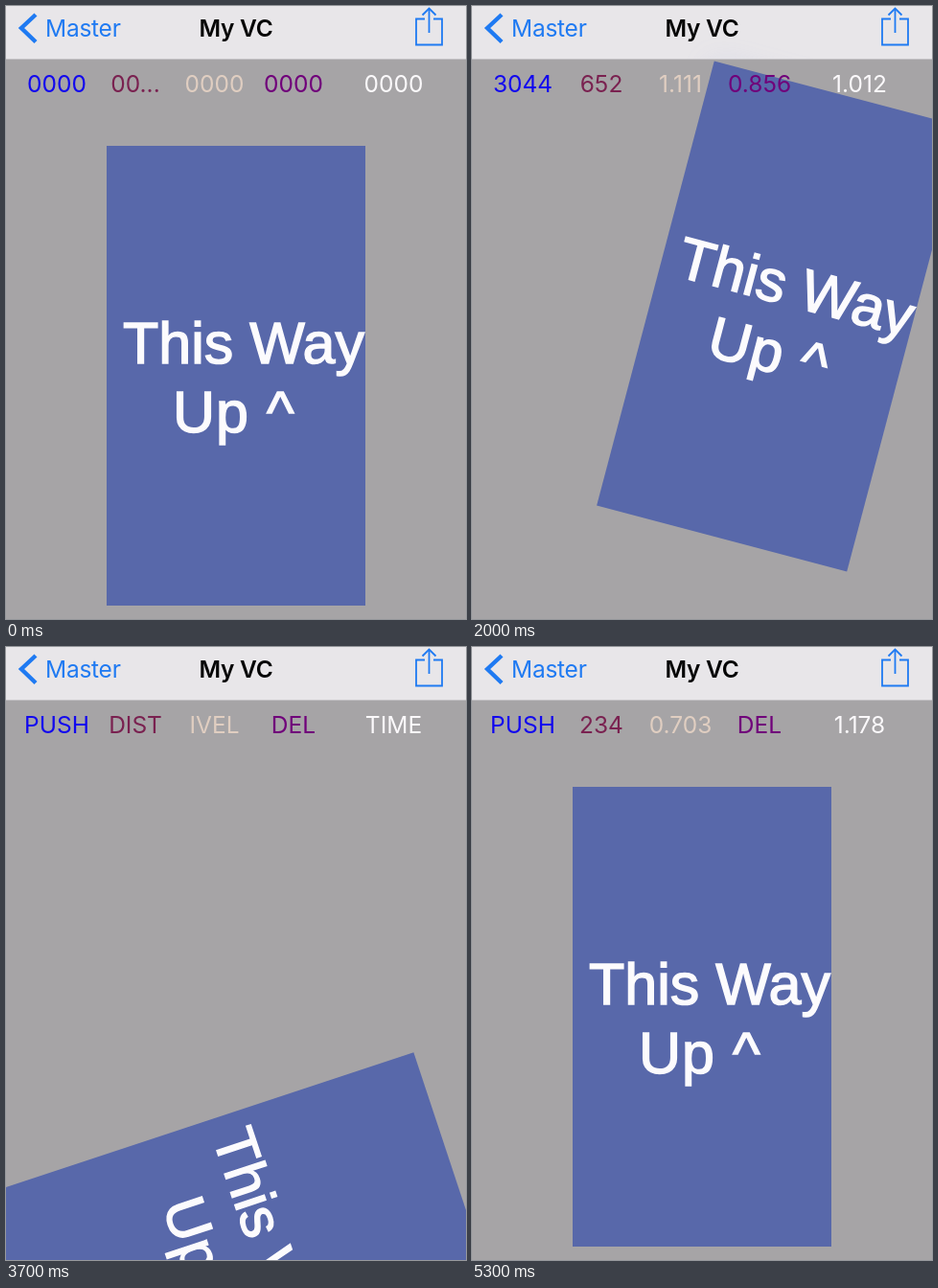
Animation, 480 px wide and 640 px high, one loop 5400 ms. Source, as an HTML page with a canvas:

```html
<!DOCTYPE html>
<html lang="en">
<head>
<meta charset="utf-8">
<title>My VC</title>
<style>
  html, body { margin: 0; width: 100%; height: 100%; overflow: hidden; background: #a6a4a6; }
  canvas { display: block; width: 480px; height: 640px; }
</style>
</head>
<body>
<canvas id="stage" width="480" height="640"></canvas>
<script>
const ctx = document.getElementById('stage').getContext('2d');
const LOOP = 5400, STEP = 100;
const GRAB = 0, FLICK = 800, RELEASE = 1000, GONE = 1400, RETURN = 1800, REGRAB = 3100, DROP = 4200;
const HOME = { x: 240, y: 386 };
const CARD = { w: 270, h: 480, color: '#5868aa' };
const BAR = 55;
const TINT = '#1f7af2';
const UI_FONT = '24.5px Inter, Roboto, sans-serif';
const CARD_FONT = '61px "Liberation Sans", Arial, sans-serif';

// Offsets from home, angles in degrees
const LOW_LEFT = { x: -78, y: 210, angle: -18.8 };
const FAR_RIGHT = { x: 360, y: -272, angle: 65 };
const LOW_TURNED = { x: 0, y: 252, angle: 75 };

const LABELS = [
  { name: 'PUSH', x: 53, color: '#1208ee' },
  { name: 'DIST', x: 135, color: '#7a2150' },
  { name: 'IVEL', x: 217.5, color: '#e0cec1' },
  { name: 'DEL', x: 300, color: '#70007a' },
  { name: 'TIME', x: 404.5, color: '#fbf9fb' }
];

function readouts(t) {
  if (t < GRAB + STEP) return ['0000', '00...', '0000', '0000', '0000'];
  if (t >= RELEASE && t <= REGRAB) return ['3044', '652', '1.111', '0.856', '1.012'];
  if (t >= DROP) return ['PUSH', '234', '0.703', 'DEL', '1.178'];
  return LABELS.map(l => l.name);
}

// Share of a finger drag covered after ms
const drag = ms => 1 - Math.exp(-((ms / 340) ** 2));

// Damped spring from 1 to 0, overshooting most at `peak` ms
function spring(ms, peak) {
  const a = Math.PI * ms / peak, damp = 0.8;
  return Math.exp(-damp * a) * (Math.cos(a) + damp * Math.sin(a));
}

const shifted = (offset, k) => ({
  x: HOME.x + offset.x * k,
  y: HOME.y + offset.y * k,
  angle: offset.angle * k
});

function poseAt(t) {
  if (t < GONE) {
    const pose = shifted(LOW_LEFT, drag(Math.min(t, FLICK) - GRAB));
    const push = (Math.max(0, t - FLICK) / 100) ** 2;
    return { x: pose.x + 15 * push, y: pose.y - 45 * push, angle: pose.angle + 2.3 * push };
  }
  if (t < RETURN) return null;
  if (t < REGRAB) return shifted(FAR_RIGHT, spring(t - RETURN, 400));
  if (t < DROP) return shifted(LOW_TURNED, drag(t - REGRAB));
  return shifted(LOW_TURNED, spring(t - DROP, 250));
}

function text(str, x, y, font, color, align = 'center', spacing = 0) {
  ctx.font = font;
  ctx.fillStyle = color;
  ctx.textAlign = align;
  ctx.letterSpacing = spacing + 'px';
  ctx.fillText(str, x, y);
}

function line(points, width = 1.8) {
  ctx.beginPath();
  points.forEach(([x, y]) => ctx.lineTo(x, y));
  ctx.strokeStyle = TINT;
  ctx.lineWidth = width;
  ctx.stroke();
}

function cardRect(pose, color) {
  ctx.translate(pose.x, pose.y);
  ctx.rotate(pose.angle * Math.PI / 180);
  ctx.fillStyle = color;
  ctx.fillRect(-CARD.w / 2, -CARD.h / 2, CARD.w, CARD.h);
}

function cardText(str, x, y, spacing) {
  text(str, x, y, CARD_FONT, '#fcfbfd', 'center', spacing);
  // a thin outline gives the medium weight
  ctx.strokeStyle = '#fcfbfd';
  ctx.lineWidth = 1.5;
  ctx.strokeText(str, x, y);
}

function drawCard(pose) {
  ctx.save();
  cardRect(pose, CARD.color);
  cardText('This Way', 8, -12.8, 0);
  cardText('Up ^', -2.2, 59.2, 1);
  ctx.restore();
}

function drawLabels(t) {
  const values = readouts(t);
  LABELS.forEach((l, i) => text(values[i], l.x, 90, UI_FONT, l.color));
}

function drawBar(pose) {
  ctx.fillStyle = '#e8e6e9';
  ctx.fillRect(0, 0, 480, BAR);
  if (pose && pose.y < 340) {
    // the card shows faintly through the translucent bar
    ctx.save();
    ctx.beginPath();
    ctx.rect(0, 0, 480, BAR);
    ctx.clip();
    ctx.globalAlpha = 0.2;
    ctx.filter = 'blur(14px)';
    cardRect(pose, '#98a5e8');
    ctx.restore();
  }
  ctx.fillStyle = '#c4c2c5';
  ctx.fillRect(0, BAR, 480, 1);

  line([[31, 9], [16, 23], [31, 37.5]], 4.4);
  text('Master', 41, 32, UI_FONT, TINT, 'left', -0.25);
  text('My VC', 240, 32, '600 ' + UI_FONT, '#050505', 'center', -0.25);

  line([[437, 13.5], [428, 13.5], [428, 40.5], [455, 40.5], [455, 13.5], [446, 13.5]]);
  line([[441.5, 2.5], [441.5, 28]]);
  line([[434.5, 9.5], [441.5, 2.5], [448.5, 9.5]]);
}

function draw(t) {
  const pose = poseAt(t);
  ctx.fillStyle = '#a6a4a6';
  ctx.fillRect(0, 0, 480, 640);
  if (pose) drawCard(pose);
  drawLabels(t);
  drawBar(pose);
}

const start = performance.now();
function tick() {
  const t = (performance.now() - start) % LOOP;
  draw(Math.floor(t / STEP) * STEP);
  requestAnimationFrame(tick);
}
tick();
</script>
</body>
</html>
```
